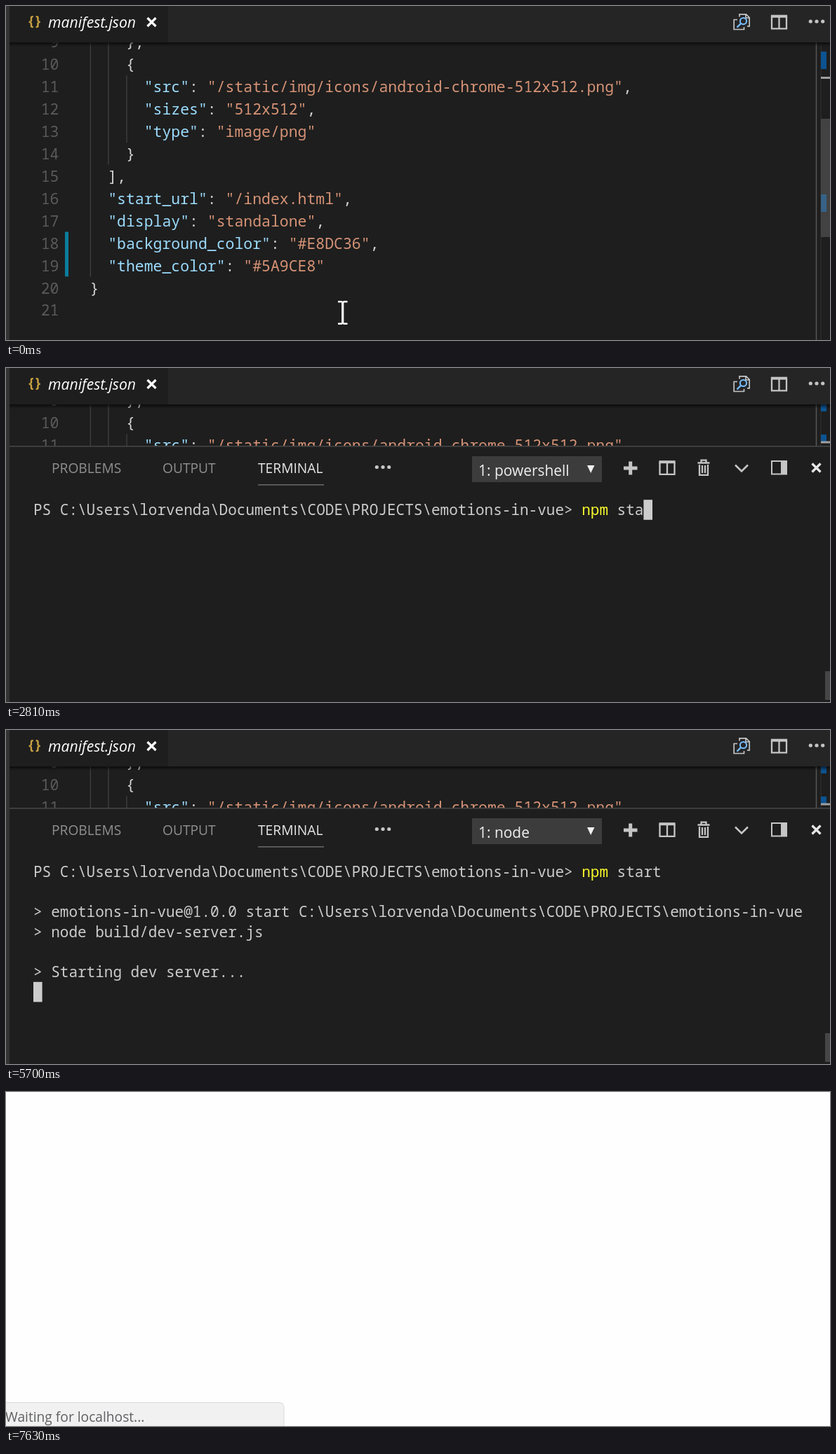
These frames come from a looping animation (1174 by 477 pixels, 8 s). An HTML page:

```html
<!DOCTYPE html>
<html lang="en">
<head>
<meta charset="utf-8">
<title>Editor and terminal</title>
<style>
  html, body { margin: 0; width: 100%; height: 100%; overflow: hidden; background: #1e1e1e; }
  svg { display: block; }
  text { white-space: pre; font-family: "Open Sans", "Noto Sans", sans-serif; }
  .code text, .term text { font-family: "Noto Sans Mono", "DejaVu Sans Mono", monospace; font-weight: 500; }
  .code text { font-size: 21.46px; fill: #d4d4d4; }
  .code .num { fill: #5a5a5a; text-anchor: end; }
  .key { fill: #9cdcfe; }
  .str { fill: #d69376; }
  .term text { font-size: 21px; fill: #ccc; }
  .term .cmd { fill: #f9f92b; }
  .term .ok { fill: #0dbc79; }
  .term .dim { fill: #666; }
  .term .ink { fill: #111; }
  .tabs { font-size: 19.2px; fill: #8f8f8f; }
  .icon { fill: none; stroke: #c5c5c5; }
  .solid { fill: #c5c5c5; }
</style>
</head>
<body>
<svg width="1174" height="477" viewBox="0 0 1174 477">
  <defs>
    <linearGradient id="shade" x2="0" y2="1">
      <stop stop-color="#000" stop-opacity=".6"/>
      <stop offset="1" stop-color="#000" stop-opacity="0"/>
    </linearGradient>
    <g id="dots" class="solid">
      <circle cx="-8.7" r="2.6"/><circle r="2.6"/><circle cx="8.7" r="2.6"/>
    </g>
    <path id="close" d="M-6-6 6 6M6-6-6 6" fill="none" stroke-width="3.2"/>
    <g id="split">
      <path class="icon" d="M-10.5-8V9.3H10.5V-8M0-8V9.3" stroke-width="2.3"/>
      <rect class="solid" x="-11.6" y="-10.3" width="23.2" height="4"/>
    </g>
  </defs>
  <rect width="1174" height="477" fill="#1e1e1e"/>

  <g id="code" class="code">
    <path id="current" d="M119 419H1154M119 449.5H1154" stroke="#282828" stroke-width="2"/>
    <path d="M120.3 40V386.5M146 40V226.8M172 99.2V194.9" stroke="#404040" stroke-width="1.3"/>
    <rect x="84" y="322.5" width="5" height="63.8" fill="#0c7d9d"/>
    <g id="lines"></g>
    <rect id="caret" x="119.4" y="418.2" width="12.6" height="31.8" fill="#aeafad"/>
  </g>

  <g id="ruler">
    <path d="M1154.5 52V477" stroke="#555" stroke-width="1.6"/>
    <path d="M1161 52V477" stroke="#303030"/>
    <g fill="#0c5391">
      <rect id="markA" x="1161" width="8"/>
      <rect id="markB" x="1161" width="8"/>
    </g>
    <rect id="here" x="1161" width="13" height="3" fill="#a0a0a0"/>
    <rect id="slider" x="1161" width="13" fill="#797979"/>
  </g>

  <g id="mouse" fill="none" stroke="#fff" stroke-width="2.4">
    <path d="M479.7 423V453" stroke-width="3.2"/>
    <path d="M473 422.3H478L479.7 423.5 481.5 422.3H486.5M473 453.7H478L479.7 452.5 481.5 453.7H486.5"/>
  </g>

  <g id="panel">
    <rect x="5" y="111" width="1169" height="366" fill="#1e1e1e"/>
    <rect x="5" y="111" width="1169" height="1.6" fill="#454545"/>
    <g class="tabs">
      <text x="65" y="149.5">PROBLEMS</text>
      <text x="223" y="149.5">OUTPUT</text>
      <text x="359" y="149.5" fill="#e7e7e7">TERMINAL</text>
    </g>
    <rect x="359" y="166" width="94" height="1.6" fill="#666"/>
    <use href="#dots" x="537" y="141.5"/>
    <rect x="664" y="126" width="185" height="37" fill="#3c3c3c"/>
    <text id="shell" x="673" y="153.5" font-size="20.9" fill="#f0f0f0"></text>
    <path d="M828 139H838.5L833.2 150Z" fill="#f0f0f0"/>
    <path class="icon" d="M880 143H899.5M889.7 133.5V152.5" stroke-width="5"/>
    <use href="#split" x="942" y="142.5"/>
    <path class="icon" d="M985.5 135.5H1002.5M990.5 135V131.7H997.5V135M988 138V152.8H1000V138M992 139V150M996 139V150" stroke-width="2.3"/>
    <path class="icon" d="M1039 138.5 1048 147.5 1057 138.5" stroke-width="2.6"/>
    <path class="icon" d="M1091 133H1112V151.5H1091Z" stroke-width="2"/>
    <rect class="solid" x="1104" y="133" width="8" height="18.5"/>
    <use href="#close" x="1154.5" y="142.5" stroke="#e7e7e7"/>
    <g id="output" class="term"></g>
    <rect id="bar" x="1167" width="7" fill="#464646"/>
  </g>

  <rect x="5" y="52" width="1169" height="6" fill="url(#shade)"/>
  <rect x="5" width="1169" height="52" fill="#252526"/>
  <rect x="5" width="226" height="52" fill="#1e1e1e"/>
  <rect width="5" height="477" fill="#333"/>
  <text x="30" y="28" font-size="19" font-weight="700" fill="#c9a140" style="font-family:'Noto Sans Mono',monospace;letter-spacing:-1.5px">{}</text>
  <text x="60" y="31" font-size="21.2" font-style="italic" fill="#fff">manifest.json</text>
  <use href="#close" x="207.5" y="23" stroke="#fff"/>
  <path class="icon" d="M1042 19.5H1037.2V33.5H1051.5V30M1045 15.5V11.8H1054.5L1059.2 16.5V28.8H1056M1054 12V17H1059" stroke-width="1.7"/>
  <g fill="none" stroke="#75beff" stroke-width="2">
    <circle cx="1050.5" cy="21.5" r="4.6"/><path d="M1047 25 1041.5 30.5" stroke-width="2.4"/>
  </g>
  <use href="#split" x="1101.5" y="23"/>
  <use href="#dots" x="1155" y="22"/>

  <g id="page">
    <rect width="1174" height="477" fill="#fefefe"/>
    <path d="M-1 443.5H389Q396 443.5 396 450.5V478H-1Z" fill="#f1f1f1" stroke="#dadada"/>
    <text x="-1" y="470.5" font-size="19.2" fill="#5f6063">Waiting for localhost...</text>
  </g>
</svg>
<script>
const LOOP = 8000, CELL = 12.6, ROW = 28.6;
const $ = id => document.getElementById(id);
const show = (id, on) => $(id).style.display = on ? "" : "none";
const set = (id, attrs) => Object.entries(attrs).forEach(([k, v]) => $(id).setAttribute(k, v));
const span = (cls, s) => `<tspan class="${cls}">${s}</tspan>`;

// Value of the last [start, value] step that has begun
const pick = (t, ...steps) => steps.filter(s => s[0] <= t).pop()[1];

const json = `    },
    {
      "src": "/static/img/icons/android-chrome-512x512.png",
      "sizes": "512x512",
      "type": "image/png"
    }
  ],
  "start_url": "/index.html",
  "display": "standalone",
  "background_color": "#E8DC36",
  "theme_color": "#5A9CE8"
}
`;
const paint = s => s.replace(/("[^"]*")(:?)/g, (m, q, colon) => span(colon ? "key" : "str", q) + colon);

$("lines").innerHTML = json.split("\n").map((s, i) => {
  const y = 59.4 + i * 31.92;
  return `<text class="num" x="75.5" y="${y}">${i + 9}</text><text x="119.5" y="${y}">${paint(s)}</text>`;
}).join("");

const path = "C:\\Users\\lorvenda\\Documents\\CODE\\PROJECTS\\emotions-in-vue";
const prompt = `PS ${path}&gt; `;
const command = "npm start";
const promptCols = path.length + 5;

const line = (row, s, col = 0) =>
  `<text x="${39 + col * CELL}" y="${210 + row * ROW}">${s}</text>`;
const block = (col, row, cols, fill) =>
  `<rect x="${39 + col * CELL}" y="${188.2 + row * ROW}" width="${cols * CELL}" height="${ROW}" fill="${fill}"/>`;

function terminal(t) {
  const typed = pick(t, [0, 0], [2200, 1], [2510, 3], [2810, 7], [3140, 9]);
  const [col, row] = pick(t, [0, [promptCols + typed, 0]], [3460, [0, 1]], [4420, [0, 5]],
    [5700, [0, 6]], [6940, [0, 2]], [7260, [0, 4]]);
  let out = block(col, row, 1, "#ccc");
  if (t < 6940) {
    const s = command.slice(0, typed);
    out += line(0, prompt + span("cmd", s.slice(0, 3)) + s.slice(3));
    if (t >= 4420) {
      out += line(2, `&gt; emotions-in-vue@1.0.0 start ${path}`) + line(3, "&gt; node build/dev-server.js");
    }
    if (t >= 5700) out += line(5, "&gt; Starting dev server...");
  } else {
    out += block(0, 0, 6, "#0dbc79") + line(0, span("ink", "DONE"), 1)
      + line(0, span("ok", "Compiled successfully in 8647ms"), 7)
      + line(0, span("dim", "15:08:36"), 80);
    if (t >= 7260) out += line(2, "&gt; Listening at http://localhost:8080");
  }
  return out;
}

let shown = "";
function draw(t) {
  const open = t >= 1560;
  set("code", { transform: `translate(0 ${t < 320 ? 0 : -5})` });
  show("current", t >= 320);
  show("caret", pick(t, [0, false], [320, true], [640, false], [1250, true]));
  show("mouse", t < 640);

  set("markA", open ? { y: 52, height: 10 } : { y: 65, height: 25 });
  set("markB", open ? { y: 95, height: 11 } : { y: 269, height: 25 });
  set("here", { y: pick(t, [0, 101], [320, 305], [1560, 104.5]) });
  set("slider", {
    ...(open ? { y: 64, height: 32 } : { y: 161, height: 169 }),
    opacity: pick(t, [0, .4], [320, .06], [930, 0], [1560, .4], [2200, 0])
  });

  show("panel", open);
  $("shell").textContent = "1: " + pick(t, [0, "powershell"], [3800, "cmd"], [4420, "node"]);
  const top = t < 6940 ? 433 : 437;
  set("bar", { y: top, height: 474 - top });
  const out = terminal(t);
  if (out !== shown) $("output").innerHTML = shown = out;
  show("page", t >= 7630);
}

const start = performance.now();
function tick() {
  draw((performance.now() - start) % LOOP);
  requestAnimationFrame(tick);
}
tick();
</script>
</body>
</html>
```
